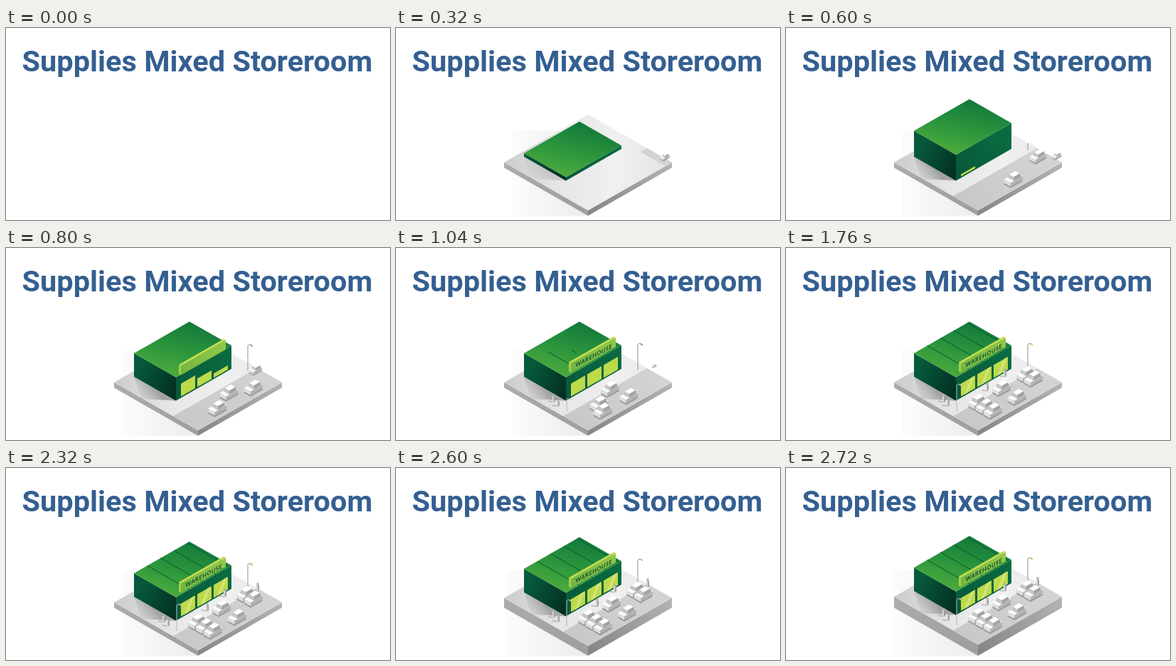
Animation of 540x270 px, one loop 2.76 s. Source, as an HTML page with a canvas:

```html
<!DOCTYPE html>
<html lang="en">
<head>
<meta charset="utf-8">
<title>Isometric store</title>
<style>
  html, body { margin: 0; width: 100%; height: 100%; overflow: hidden; background: #fff; }
  canvas { position: absolute; left: 0; top: 0; width: 540px; height: 270px; }
  h1 {
    position: absolute; left: 0; top: 22px; width: 538px; margin: 0;
    font: 600 41.5px/50px Roboto, Arial, sans-serif;
    color: #345f91; text-align: center; white-space: nowrap;
  }
</style>
</head>
<body>
<canvas id="stage"></canvas>
<h1>Supplies Mixed Storeroom</h1>
<script>
const LOOP = 2760, STEP = 40;
const SLOPE = .572, HALF = 59;
const WALL = 7, ROOF = 33;
const canvas = document.getElementById('stage');
const c = canvas.getContext('2d');
const ratio = window.devicePixelRatio || 1;
canvas.width = 540 * ratio;
canvas.height = 270 * ratio;

const prog = (t, start, dur) => Math.min(1, Math.max(0, (t - start) / dur));
const out = p => 1 - (1 - p) ** 2;
const smooth = p => p * p * (3 - 2 * p);
const mix = (a, b, p) => a + (b - a) * p;

// Ground axes: a runs down to the right, b down to the left, z up.
const iso = (a, b, z = 0) => [270 + a - b, 189 + (a + b) * SLOPE - z];

function path(points) {
  c.beginPath();
  points.forEach(p => c.lineTo(...p));
}

function poly(fill, ...points) {
  path(points);
  c.fillStyle = fill;
  c.fill();
}

function line(color, width, ...points) {
  path(points);
  c.strokeStyle = color;
  c.lineWidth = width;
  c.stroke();
}

function floor(fill, a0, a1, b0, b1, z = 0) {
  poly(fill, iso(a0, b0, z), iso(a1, b0, z), iso(a1, b1, z), iso(a0, b1, z));
}

// Upright rectangle on the plane of constant a.
function panel(fill, a, b0, b1, z0, z1) {
  poly(fill, iso(a, b0, z0), iso(a, b1, z0), iso(a, b1, z1), iso(a, b0, z1));
}

// Block with its three visible faces; the top may be inset.
function box([a0, a1], [b0, b1], [z0, z1], [top, left, right], inset = 0) {
  const n = inset;
  poly(left, iso(a0, b1, z0), iso(a1, b1, z0), iso(a1 - n, b1 - n, z1), iso(a0 + n, b1 - n, z1));
  poly(right, iso(a1, b0, z0), iso(a1, b1, z0), iso(a1 - n, b1 - n, z1), iso(a1 - n, b0 + n, z1));
  floor(top, a0 + n, a1 - n, b0 + n, b1 - n, z1);
}

function grad([x1, y1], [x2, y2], ...colors) {
  const g = c.createLinearGradient(x1, y1, x2, y2);
  colors.forEach((color, i) => g.addColorStop(i / (colors.length - 1), color));
  return g;
}

function haze(t, lift) {
  const x = 163 - lift * 1.5;
  c.globalAlpha = prog(t, 40, 240);
  c.fillStyle = grad([x, 0], [270, 0], '#fcfcfc', '#ececec');
  c.fillRect(x, 144, 270 - x, 120);
  c.globalAlpha = 1;
}

function platform(t, lift) {
  const r = HALF * out(prog(t, 10, 230));
  const front = iso(HALF, HALF), left = iso(-HALF, HALF), right = iso(HALF, -HALF);
  box([-r, r], [-r, r], [-7.5 - lift, 0], [
    grad(left, right, '#cbcbcb', '#e6e6e6', '#f0f0f0', '#e4e4e4'),
    grad(left, front, '#acacac', '#9e9e9e'),
    grad(front, right, '#868686', '#b4b4b4')
  ]);
  const p = smooth(prog(t, 270, 290));
  floor(grad([250, 250], [370, 180], '#c8c8c8', '#d3d3d3'), 24, HALF, -HALF, mix(-HALF, HALF, p));
}

function building(t) {
  const s = out(prog(t, 120, 160));
  if (!s) return;
  const h = mix(3, 37, smooth(prog(t, 280, 280))) - (37 - ROOF) * smooth(prog(t, 560, 180));
  const span = (mid, half) => [mid - half * s, mid + half * s];
  const back = iso(-52, -40, h), left = iso(-52, 38), front = iso(WALL, 38), right = iso(WALL, -40);

  c.globalAlpha = prog(t, 200, 300);
  poly(grad(iso(-20, 60), iso(-22, 38), 'rgba(150,150,150,.1)', 'rgba(120,120,120,.6)'),
    left, front, iso(-20, 60));
  c.globalAlpha = 1;
  box([-52, WALL].map((v, i) => span(-22.5, 29.5)[i]), span(-1, 39), [0, h], [
    grad(back, iso(WALL, 38, h), '#12793c', '#2a943c', '#4cab3d'),
    grad(left, front, '#07593b', '#022b20'),
    grad(front, right, '#07583a', '#0a6a41')
  ]);

  for (let i = 1; i <= 4; i++) {
    const p = smooth(prog(t, 870 + i * 65, 200));
    const b = 38 - i * 18.7;
    if (p) line('#07552f', 1, iso(mix(-19, -52, p), b, h), iso(mix(-19, WALL, p), b, h));
  }
}

function windows(t) {
  for (let i = 0; i < 3; i++) {
    const b = 31 - 23 * i, top = 2 + 18 * prog(t, 560 + i * 80, 240);
    if (top === 2) continue;
    panel('#bdda4b', WALL, b - 20, b, 2, top);
    c.globalAlpha = prog(t, 1160, 160);
    poly('#d3e476', iso(WALL, b - 5, 2), iso(WALL, b - 10, 2), iso(WALL, b - 19, top), iso(WALL, b - 14, top));
    c.globalAlpha = 1;
  }
}

function sign(t) {
  const p = out(prog(t, 700, 220));
  if (!p) return;
  const z = mix(27, 39, p), face = WALL + 3;
  c.save();
  c.globalAlpha = Math.min(1, p * 2);
  box([WALL, face], [-29, 34], [z, z + 13],
    ['#c0dc50', '#a4cf48', grad([246, 0], [309, 0], '#74b643', '#92c849')]);
  c.globalAlpha = prog(t, 840, 140);
  c.translate(...iso(face, 27.5, z + 3.5));
  c.transform(.87, -.87 * .53, 0, 1, 0, 0);
  c.font = '700 8.4px Lato, "Open Sans", sans-serif';
  c.letterSpacing = '.7px';
  c.fillStyle = '#0a4a30';
  c.fillText('WAREHOUSE', 0, 0);
  c.restore();
}

function lamp(t, side, start, color) {
  const p = out(prog(t, start, 300));
  if (!p) return;
  const [x, y] = iso(20, side * 50), top = y - 36 * p;
  line(color, 1, [x, y], [x, top], [x + 2 * p, top - 1.5 * p], [x + 6 * p, top - p]);
  line(t >= 1600 && side < 0 ? '#c9c45a' : color, 1.6 * p, [x + 4, top - 1], [x + 7, top + 1]);
}

function person(a, b, p) {
  if (!p) return;
  const [x, y] = iso(a, b), at = (dx, dy) => [x + dx, y + dy * p];
  line('rgba(130,130,130,.5)', 1.5, at(0, 0), at(-8, -1));
  line('#a2a2a2', 4, at(0, -4), at(0, -8.5));
  line('#d6d6d6', 2, at(-1, 0), at(-1, -8.5));
  line('#8f8f8f', 1.5, at(1, 0), at(1, -5));
  c.beginPath();
  c.arc(...at(0, -10), 1.7 * p, 0, 7);
  c.fillStyle = '#adadad';
  c.fill();
}

function people(t) {
  const spots = [[0, 48], [8, 50], [17, 4], [12, -26], [28, -56]];
  spots.forEach(([a, b], i) => person(a, b, out(prog(t, 900 + 65 * i * i, 160))));
}

function car(a, b, s) {
  const across = (lo, hi) => [a + lo * s, a + hi * s];
  const along = (lo, hi) => [b + lo * s, b + hi * s];
  floor('rgba(90,90,90,.45)', ...across(-4.5, 5.5), ...along(-8, 9.5));
  box(across(-4.5, 4.5), along(-8.5, 8.5), [s, 6 * s], ['#fafafa', '#dedede', '#b3b3b3']);
  box(across(-4.3, 4.3), along(-7, 4), [6 * s, 10.5 * s], ['#ffffff', '#c6c6c6', '#a3a3a3'], 1.3 * s);
}

// Three rows of three places, two of them left empty; each car rolls in along b.
function traffic(t) {
  for (let row = 0; row < 3; row++) {
    for (let col = 0; col < 3; col++) {
      if (row < 2 && row + col === 2) continue;
      const start = 280 + (2 - col) * 230 + (2 - row) * 280;
      const p = out(prog(t, start, 500 + 100 * row));
      const size = out(prog(t, start, 130));
      if (size) car(27 + 11 * col, mix(-70, -40 + 34 * row, p), size);
    }
  }
}

function draw(t) {
  c.setTransform(ratio, 0, 0, ratio, 0, 0);
  c.clearRect(0, 0, 540, 270);
  if (t < STEP) return;
  const lift = 8 * smooth(prog(t, 2330, 390));
  haze(t, lift);
  c.translate(0, -lift);
  platform(t, lift);
  building(t);
  windows(t);
  sign(t);
  lamp(t, -1, 560, '#929292');
  people(t);
  traffic(t);
  lamp(t, 1, 960, '#b4b4b4');
}

function tick() {
  const t = performance.now() % LOOP;
  draw(Math.floor(t / STEP) * STEP);
  requestAnimationFrame(tick);
}
tick();
</script>
</body>
</html>
```
